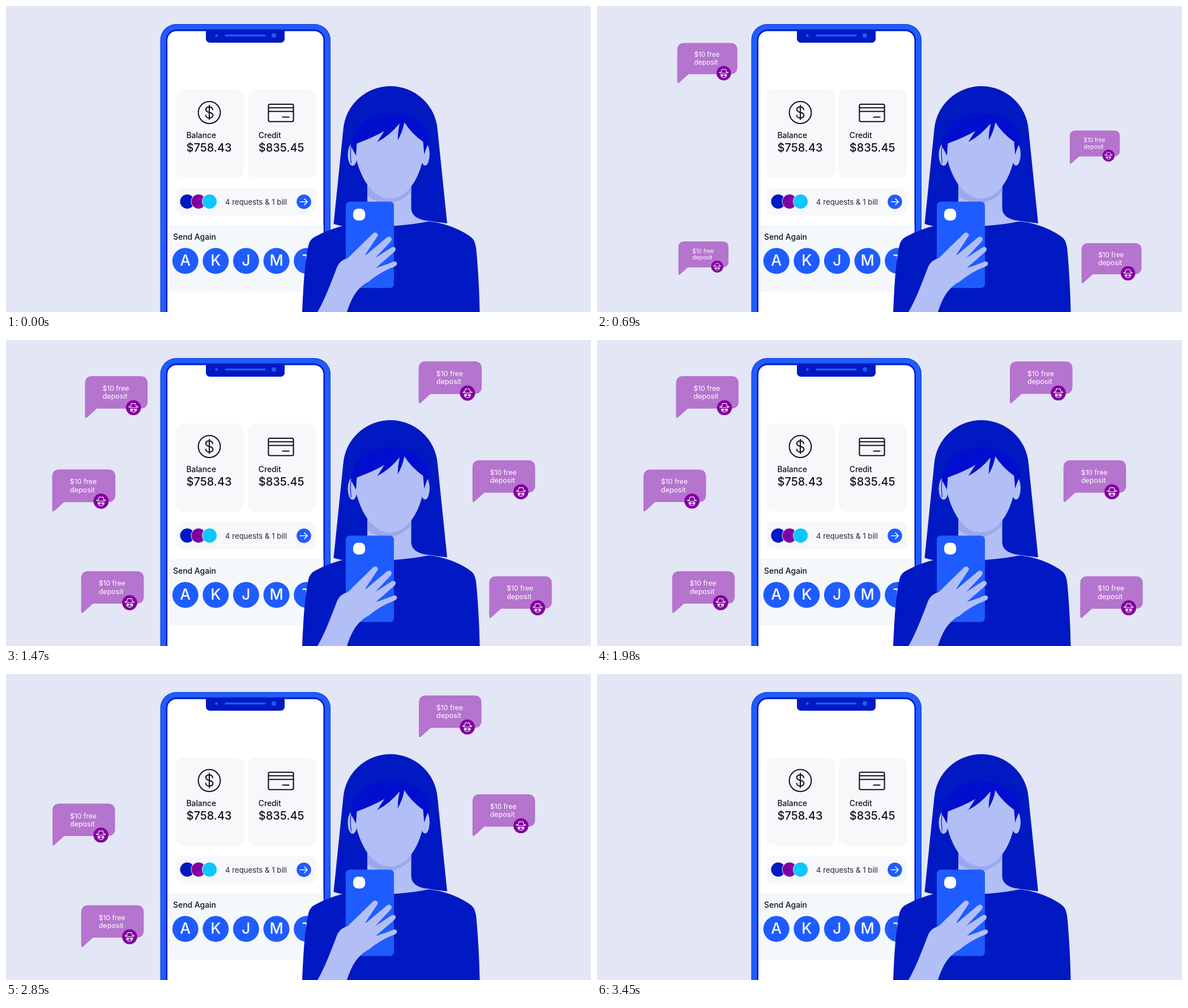
Write an HTML page with a canvas that moves like this. It is 1033 by 542 pixels and loops after 3600 ms.

```html
<!DOCTYPE html>
<html lang="en">
<head>
<meta charset="utf-8">
<title>Phone messages</title>
<style>
  html, body { margin: 0; width: 100%; height: 100%; overflow: hidden; background: #e3e6f5; }
  canvas { display: block; width: 1033px; height: 542px; }
</style>
</head>
<body>
<canvas id="stage" width="1033" height="542"></canvas>
<script>
const ctx = document.getElementById('stage').getContext('2d');
const LOOP = 3600;
const BG = '#e3e6f5', NAVY = '#0019c3', BLUE = '#1f5cff', SKIN = '#b2bff7', SHADE = '#9ba8ef',
  INK = '#10121f', CARD = '#f6f8fa', PURPLE = '#82009f', LILAC = '#b574ce', CYAN = '#0cc6ff';

// Centre of each bubble and its place in the staggered order.
const bubbles = [
  [194.75, 101, 0], [908.5, 455.5, 0],
  [879, 250, 1], [188, 446.5, 1],
  [784.3, 75, 2], [137.3, 266.5, 2]
];

function fillPath(d, color) {
  ctx.fillStyle = color;
  ctx.fill(new Path2D(d));
}

function strokePath(d, color, width) {
  ctx.strokeStyle = color;
  ctx.lineWidth = width;
  ctx.lineCap = ctx.lineJoin = 'round';
  ctx.stroke(new Path2D(d));
}

function box(x, y, w, h, r, color) {
  ctx.fillStyle = color;
  ctx.beginPath();
  ctx.roundRect(x, y, w, h, r);
  ctx.fill();
}

function oval(x, y, rx, ry, color) {
  ctx.fillStyle = color;
  ctx.beginPath();
  ctx.ellipse(x, y, rx, ry, 0, 0, Math.PI * 2);
  ctx.fill();
}

function disc(x, y, r, color) {
  oval(x, y, r, r, color);
}

function label(text, x, y, size, color = INK, weight = 500, align = 'left') {
  ctx.font = `${weight} ${size}px Inter, sans-serif`;
  ctx.textAlign = align;
  ctx.fillStyle = color;
  ctx.fillText(text, x, y);
}

function drawPhone() {
  box(272.5, 32, 300.5, 560, 28, '#0b36d8');
  box(273.5, 33, 298.5, 560, 27, BLUE);
  box(282.5, 41.5, 280.5, 560, 19, NAVY);
  box(285, 44.5, 275.5, 560, 16, '#fff');
  box(353, 42, 139, 23, [0, 0, 7, 7], NAVY);
  disc(371.5, 52.3, 2.4, BLUE);
  box(386.5, 50.6, 72, 3.4, 1.7, BLUE);
  disc(473, 52.3, 4, BLUE);

  box(299.5, 148, 120.5, 156.5, 14, CARD);
  box(427, 148, 120.5, 156.5, 14, CARD);
  strokePath('M378.4 188.7 a19.4 19.4 0 1 1 -38.8 0 a19.4 19.4 0 1 1 38.8 0', INK, 2);
  strokePath('M359 176 V201 M365 183.5 C364.5 180 362 178.8 359 178.8 C355.5 178.8 352.8 180.5 352.8 183.6 C352.8 190.5 365.4 186.5 365.4 193.6 C365.4 196.8 362.5 198.4 359 198.4 C355.5 198.4 353 196.8 352.6 193.5', INK, 2);
  strokePath('M466 174 H505 Q507.6 174 507.6 176.5 V202 Q507.6 204.8 505 204.8 H466 Q463.4 204.8 463.4 202 V176.5 Q463.4 174 466 174 Z M463.4 180.2 H507.6 M463.4 186.8 H507.6 M488.5 196.7 H499.5', INK, 2.1);
  label('Balance', 318.5, 233.5, 13.8);
  label('$758.43', 318.5, 258.3, 20);
  label('Credit', 445.8, 233.5, 13.8);
  label('$835.45', 445.8, 258.3, 20);

  box(299.5, 322, 248, 49, 12, CARD);
  [[320, NAVY], [340, PURPLE], [359.5, CYAN]].forEach(([x, color]) => {
    disc(x, 346.3, 13.4, CARD);
    disc(x, 346.3, 12.6, color);
  });
  label('4 requests & 1 bill', 387, 352, 13.2, '#24263a', 400);
  disc(526, 346.8, 12.8, BLUE);
  strokePath('M519.5 346.8 H532 M527 341.6 L532.3 346.8 L527 352', '#fff', 1.5);

  box(285, 388, 275.5, 118, 0, '#f5f8fb');
  label('Send Again', 295, 414, 13.9);
  [...'AKJMT'].forEach((letter, i) => {
    const x = 316.7 + i * 53.6;
    disc(x, 451.5, 23, BLUE);
    label(letter, x, 460.3, 26.5, '#fff', 500, 'center');
  });
}

function drawWoman() {
  // Hair, neck and shoulders
  fillPath('M578.5 386 L595.5 219 A83.5 83.5 0 0 1 762 219 L779 385 Q760 383 742 380 L620 393 Q598 392 578.5 386 Z', NAVY);
  fillPath('M638 300 H715.5 V358 C716 374 731 379 750 381.5 L742 396 H638 Z', SKIN);
  fillPath('M638 318 Q678 352 715.5 318 V329 Q678 366 638 336 Z', SHADE);
  fillPath('M523 542 C525 498 527 456 534 424 Q536 414 545 409 Q570 395 601 388 Q642 394 685 389.5 Q721 387 746 381.5 C776 384 808 398 823 411 Q829 417 830.5 432 C834 470 836 510 836.5 542 Z', NAVY);

  // Head
  oval(612, 263.5, 8.5, 19.5, SKIN);
  oval(740, 262.5, 8, 20, SKIN);
  strokePath('M609.5 247 Q607 260 609.5 278', NAVY, 1.2);
  fillPath('M615 240 L700 202 L740 238 C740 284 717 341 678 341 C640 341 615 284 615 240 Z', SKIN);
  fillPath('M609 248 C611 211 642 190 680 190 C719 190 747 212 748 240 Q742 250 738.5 263.5 L736.5 240.5 Q715 225 703.5 206 Q700 224 691.5 238 Q692 222 695 208 Q678 229 655.5 241 L668 221.5 Q648 233 619.5 243.5 L618 265 Z', '#000fcd');

  // Handset
  box(600, 346.5, 85, 153, 7, BLUE);
  box(613, 359, 21.2, 21, 8.5, '#fff');

  // Arm, palm and tapered fingers
  fillPath('M550 542 C563 520 574 490 584 464 Q589 450 605 446 L626 436 L650 448 L655 470 L640 488 C616 502 609 522 602 542 Z', SKIN);
  fillPath('M603 447 L648.5 402.5 Q653.5 399.5 656.5 404 Q657.5 406.5 654.5 410 L630 447 L615 462 Z', SKIN);
  fillPath('M625 450 L672 410.5 Q677.5 406.5 680.5 411 Q682 414.5 678 418.5 L641 458 Z', SKIN);
  fillPath('M634 458 L681 427.5 Q686.5 425 688 430 Q688.5 433 685 436 L646 470 Z', SKIN);
  fillPath('M638 468 Q660 463 685 452.5 Q690 452 690.5 456.5 Q690 459.5 686 461.5 Q660 471 638 490 Z', SKIN);
}

function drawBubble(x, y, scale) {
  if (scale <= 0) return;
  ctx.save();
  ctx.translate(x, y);
  ctx.scale(scale, scale);
  fillPath('M-42 -37 H42 Q55.25 -37 55.25 -24 V7.5 Q55.25 20.5 42 20.5 H-34.5 L-51.5 36 Q-55.25 38.5 -55.25 34 V-24 Q-55.25 -37 -42 -37 Z', LILAC);
  label('$10 free', -24.3, -11, 12.2, '#fff', 400);
  label('deposit', -24.3, 3.4, 12.5, '#fff', 400);
  ctx.translate(30.3, 18.8);
  disc(0, 0, 13.3, PURPLE);
  strokePath('M-4.8 -2 L-3.8 -6.5 Q-3 -8 0 -7 Q3 -8 3.8 -6.5 L4.8 -2 M-8.4 -1.4 Q0 1.8 8.4 -1.4 M-8.4 -1.4 L-4.8 -2.4 M8.4 -1.4 L4.8 -2.4 M-5.4 2 Q-5.4 7.8 0 8 Q5.4 7.8 5.4 2', '#fff', 1.1);
  oval(-2.8, 3.6, 2.3, 1.6, '#fff');
  oval(2.8, 3.6, 2.3, 1.6, '#fff');
  ctx.restore();
}

// Linear growth, a decaying wobble around full size, then linear shrinking.
function bubbleScale(time, order) {
  const ramp = 300;
  const delay = order * 300;
  const age = time - 150 - delay;
  const leaving = time - 2550 - delay;
  if (age <= 0) return 0;
  if (leaving > 0) return Math.max(0, 1 - leaving / ramp);
  if (age < ramp) return age / ramp;
  const t = age - ramp;
  const omega = 2 * Math.PI / 300;
  return 1 + Math.sin(omega * t) * Math.exp(-t / 180) / (omega * ramp);
}

function render(time) {
  ctx.fillStyle = BG;
  ctx.fillRect(0, 0, 1033, 542);
  drawPhone();
  drawWoman();
  bubbles.forEach(([x, y, order]) => drawBubble(x, y, bubbleScale(time, order)));
}

let start;
function tick(now) {
  start ??= now;
  render((now - start) % LOOP);
  requestAnimationFrame(tick);
}
requestAnimationFrame(tick);
</script>
</body>
</html>
```
